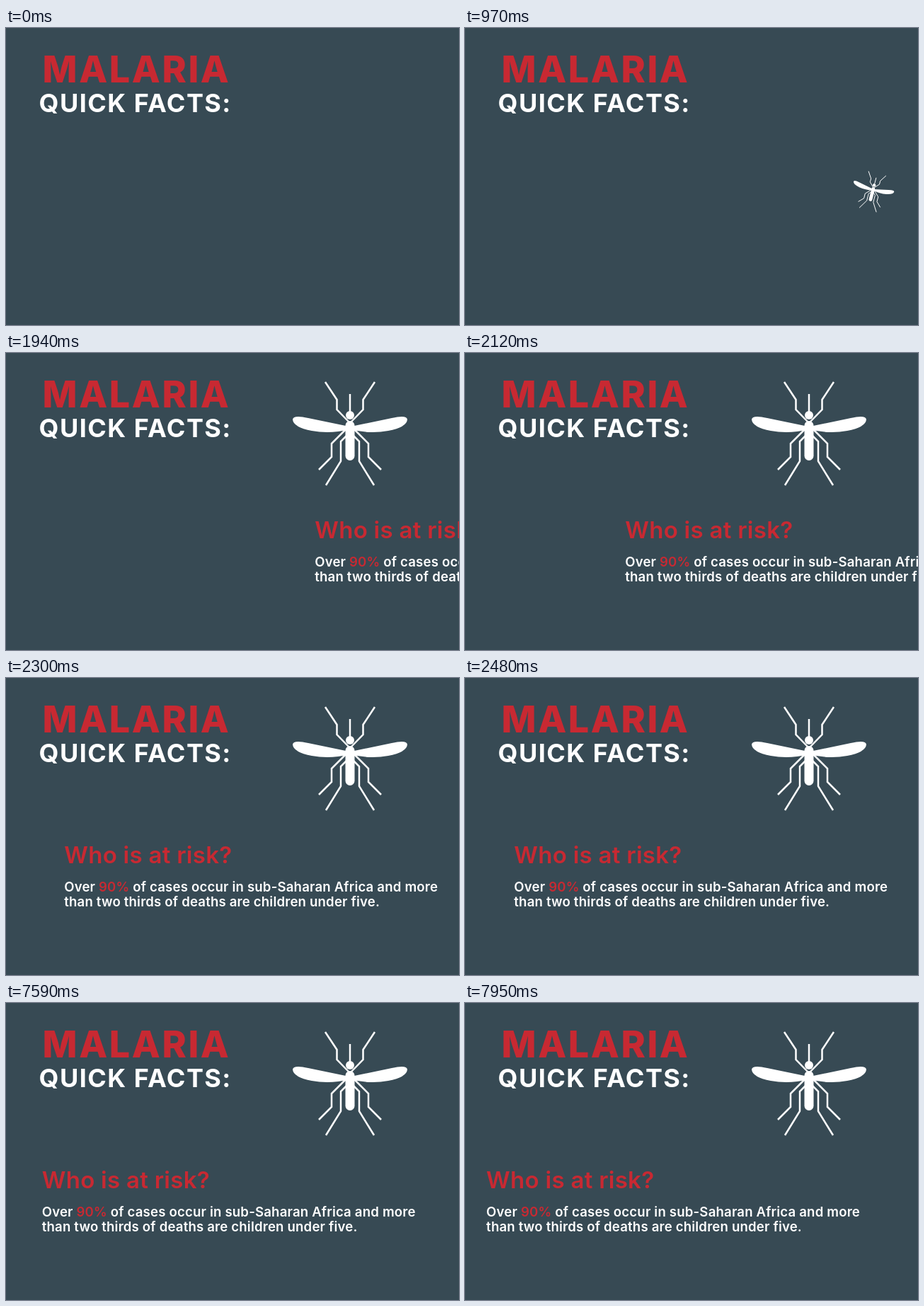
Animation, 640 px wide and 420 px high, one loop 8000 ms. Source, as an HTML page:

```html
<!DOCTYPE html>
<html lang="en">
<head>
<meta charset="utf-8">
<title>Malaria quick facts</title>
<style>
  html, body { margin: 0; width: 100%; height: 100%; overflow: hidden; background: #374a54; }
  svg { display: block; width: 640px; height: 420px; font-family: Inter, sans-serif; font-optical-sizing: none; fill: #fff; }
  .red { fill: #c82932; }
  .malaria { font-size: 52px; font-weight: 800; letter-spacing: 2.6px; }
  .quick { font-size: 36px; font-weight: 700; letter-spacing: 1.45px; }
  .question { font-size: 33px; font-weight: 600; letter-spacing: .28px; }
  .answer { font-size: 18.6px; font-weight: 600; letter-spacing: .18px; }
  .leg { fill: none; stroke: #fff; stroke-width: 2.5; }
</style>
</head>
<body>
<svg viewBox="0 0 640 420">
  <text class="malaria red" x="51.5" y="77">MALARIA</text>
  <text class="quick" x="46.5" y="119">QUICK FACTS:</text>
  <g id="mosquito">
    <g id="side">
      <path d="M1-10L59-22Q80-27 81-20Q80-9 54-4Q28 1 1-6Z"/>
      <path class="leg" d="M35-73L18.5-48V-34L2-17M44 51L26 33V14L5-7M34 73L13 39V11L2 0"/>
    </g>
    <use href="#side" transform="scale(-1 1)"/>
    <path class="leg" d="M0-56V-30"/>
    <circle cy="-26" r="6"/>
    <rect x="-6.5" y="-18" width="13" height="56" rx="6.5"/>
  </g>
  <g id="fact">
    <text class="question red" y="262">Who is at risk?</text>
    <text class="answer" y="302">Over <tspan class="red">90%</tspan> of cases occur in sub-Saharan Africa and more</text>
    <text class="answer" y="323">than two thirds of deaths are children under five.</text>
  </g>
</svg>
<script>
const LOOP = 8000, TICK = 180;
const mosquito = document.getElementById('mosquito');
const fact = document.getElementById('fact');

// Zigzag flight: x, y, scale, angle, one pose per tick
const flight = [
  [581, 281, .247, -22],
  [553.3, 252, .306, 25],
  [575.8, 231.5, .365, 14.5],
  [599, 210.7, .43, 0],
  [556.4, 174.5, .645, -13],
  [513.8, 138.5, .86, -7],
  [486, 114, 1, 0]
];

const ticksSince = (start, t) => Math.floor((t - start) / TICK);

function flightPose(t) {
  if (t < 610) return null;
  return flight[t < 1760 ? Math.min(5, ticksSince(610, t)) : 6];
}

// Fast entry, slow settle, rest, then drift out to the left
function factLeft(t) {
  if (t < 1940) return 700;
  if (t >= 7590) return 51.5 - 10.3 * ticksSince(7590, t);
  if (t >= 2720) return 53;
  const n = ticksSince(1940, t);
  return n < 2 ? 437 - 210 * n : 83 - 12.9 * (n - 2);
}

function draw(now) {
  const t = now % LOOP;
  const pose = flightPose(t);
  mosquito.style.display = pose ? '' : 'none';
  if (pose) {
    const [x, y, scale, angle] = pose;
    mosquito.setAttribute('transform', `translate(${x} ${y}) rotate(${angle}) scale(${scale})`);
  }
  fact.setAttribute('transform', `translate(${factLeft(t) - .8} 0)`);
}

const start = performance.now();
function frame() {
  draw(performance.now() - start);
  requestAnimationFrame(frame);
}
frame();
</script>
</body>
</html>
```
